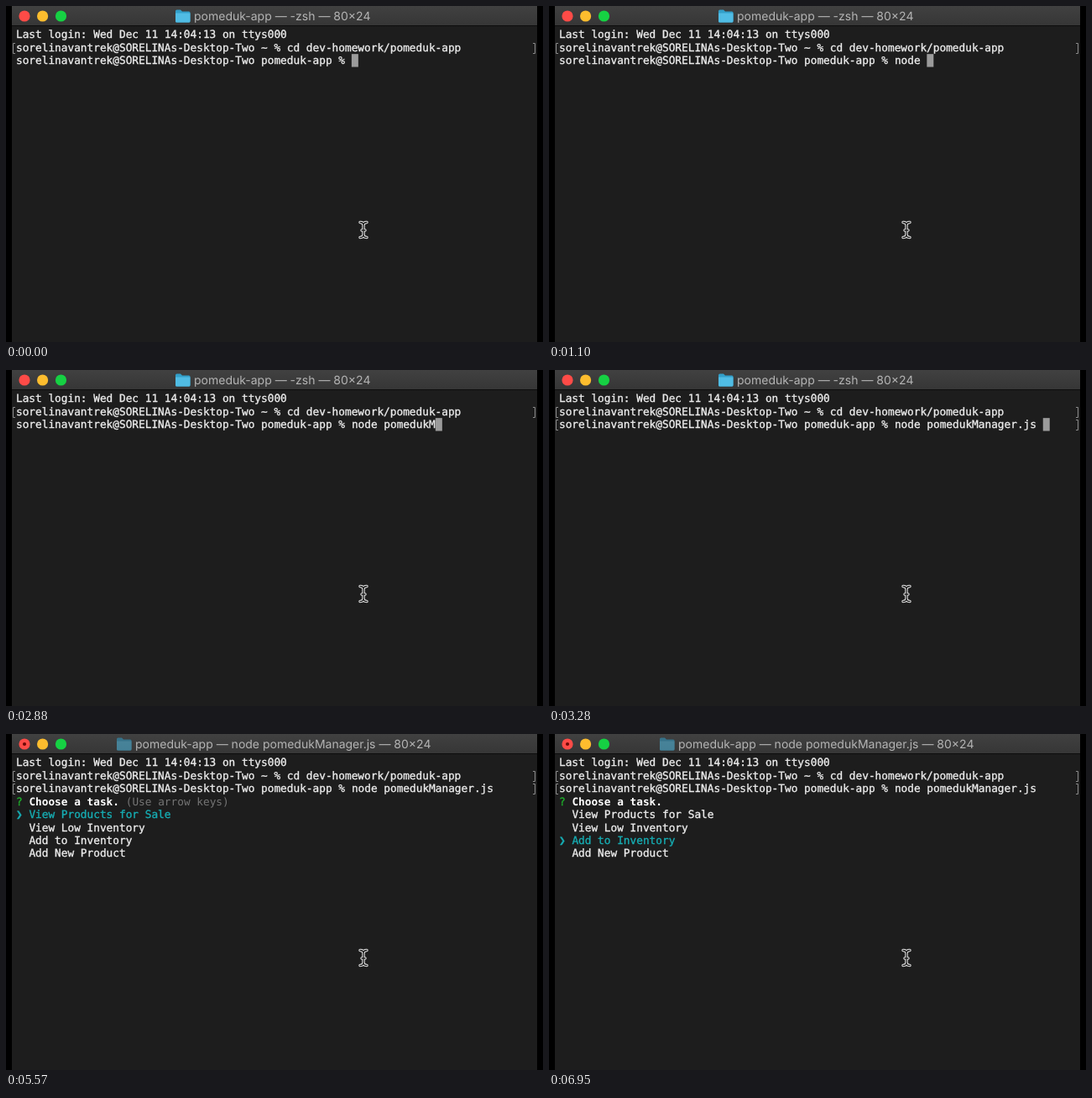
These frames come from a looping animation (640x400 px, 8 s). An HTML page:

```html
<!DOCTYPE html>
<html lang="en">
<head>
<meta charset="utf-8">
<title>Terminal</title>
<style>
  html, body { margin: 0; width: 100%; height: 100%; overflow: hidden; background: #000; }
  svg { display: block; width: 640px; height: 400px; }
  text { white-space: pre; text-rendering: geometricPrecision; }
  .term text {
    font: 12.773px "DejaVu Sans Mono", monospace;
    fill: #ececec; stroke: #ececec; stroke-width: .35px;
  }
  .term .bold { font-weight: bold; fill: #fff; stroke: none; }
  .term .ask { fill: #1fae2b; stroke: #1fae2b; }
  .term .hint { fill: #757575; stroke: none; }
  .term .on { fill: #16adb3; stroke: #16adb3; }
  .title { font: 14px Inter, sans-serif; fill: #b4b4b4; }
  .marks { fill: none; stroke: #8c8c8c; stroke-width: 1; }
</style>
</head>
<body>
<svg viewBox="0 0 640 400">
  <defs>
    <linearGradient id="barFill" x2="0" y2="1">
      <stop offset="0" stop-color="#414141"/>
      <stop offset="1" stop-color="#363636"/>
    </linearGradient>
    <path id="marks" d="M11 -9.5H8.5V2.5H11M628 -9.5H630.5V2.5H628"/>
    <path id="beam" d="M422 257.5Q426 257.5 426 261Q426 257.5 430 257.5M426 260V273M422 275.5Q426 275.5 426 272Q426 275.5 430 275.5M424 267H428"/>
  </defs>

  <rect x="7" width="626" height="400" fill="#1d1d1d"/>
  <rect x="7" width="626" height="23" fill="url(#barFill)"/>
  <rect x="7" y="23" width="626" height="1" fill="#0c0c0c"/>
  <circle cx="22" cy="12" r="6.6" fill="#fe4b47"/>
  <circle id="dot" cx="22" cy="12" r="2.1" fill="#6d0906"/>
  <circle cx="43.6" cy="12" r="6.6" fill="#fdbd2e"/>
  <circle cx="65.5" cy="12" r="6.6" fill="#16d143"/>

  <g id="heading">
    <g id="folder">
      <path d="M0 6Q0 4.5 1.5 4.5H6L8 6.5H16Q17.5 6.5 17.5 8V18Q17.5 19.5 16 19.5H1.5Q0 19.5 0 18Z" fill="#329fc9"/>
      <path d="M0 8.5H17.5V18Q17.5 19.5 16 19.5H1.5Q0 19.5 0 18Z" fill="#50bce4"/>
    </g>
    <text id="title" class="title" x="22" y="17.2"></text>
  </g>

  <g id="term" class="term"></g>
  <rect id="cursor" width="8" height="15.4" fill="#9b9b9b"/>

  <g fill="none" stroke-linecap="round">
    <use href="#beam" stroke="#e4e4e4" stroke-width="3.4"/>
    <use href="#beam" stroke="#1d1d1d" stroke-width="1.3"/>
  </g>
</svg>

<script>
  const LOOP = 8000, LEFT = 12, CELL = 7.69, ROW = 15.43, BASE = 38.4;
  const NS = "http://www.w3.org/2000/svg";
  const $ = id => document.getElementById(id);
  const term = $("term");
  const baseline = row => BASE + row * ROW;

  function write(row, col, string, cls = "") {
    const el = document.createElementNS(NS, "text");
    el.setAttribute("x", LEFT + col * CELL);
    el.setAttribute("y", baseline(row));
    el.setAttribute("class", cls);
    el.textContent = string;
    term.append(el);
    return el;
  }

  function bracket(row) {
    const el = document.createElementNS(NS, "use");
    el.setAttribute("href", "#marks");
    el.setAttribute("y", Math.round(baseline(row)));
    el.setAttribute("class", "marks");
    term.append(el);
    return el;
  }

  const show = (el, on) => el.setAttribute("visibility", on ? "visible" : "hidden");

  const host = "sorelinavantrek@SORELINAs-Desktop-Two";
  const app = "pomeduk-app";
  const command = "node pomedukManager.js ";
  const prompt = `${host} ${app} % `;

  write(0, 0, "Last login: Wed Dec 11 14:04:13 on ttys000");
  write(1, 0, `${host} ~ % cd dev-homework/${app}`);
  write(2, 0, prompt);
  bracket(1);
  const entered = bracket(2);
  const typed = write(2, prompt.length, "");

  const hint = write(3, 17, "(Use arrow keys)", "hint");
  const pointer = write(4, 0, "❯", "on");
  const items = ["View Products for Sale", "View Low Inventory", "Add to Inventory", "Add New Product"]
    .map((label, i) => write(4 + i, 2, label));
  const menu = [write(3, 0, "?", "ask"), write(3, 2, "Choose a task.", "bold"), pointer, ...items];

  // [time, characters typed]
  const keys = [[0, 0], [410, 1], [550, 2], [690, 3], [830, 4], [1100, 5], [1640, 6], [1780, 7],
    [1920, 9], [2200, 11], [2340, 12], [2880, 13], [3010, 14], [3140, 15], [3280, 23]];
  const ENTER = 3820, RUN = 3960, MENU = 5570, MOVES = [6550, 6820];

  function draw(t) {
    const count = keys.filter(([at]) => at <= t).pop()[1];
    const sent = t >= ENTER, running = t >= RUN, choosing = t >= MENU;
    const picked = MOVES.filter(at => at <= t).length;

    typed.textContent = command.slice(0, count);
    show(entered, t >= 3280);
    $("cursor").setAttribute("x", LEFT + (sent ? 0 : prompt.length + count) * CELL);
    $("cursor").setAttribute("y", baseline(sent ? 3 : 2) - 12.1);
    show($("cursor"), !choosing);

    show($("dot"), running);
    $("heading").setAttribute("transform", `translate(${running ? 132 : 202} 0)`);
    $("folder").setAttribute("opacity", running ? .55 : 1);
    $("title").textContent = `${app} — ${running ? command.trim() : "-zsh"} — 80×24`;

    menu.forEach(el => show(el, choosing));
    show(hint, choosing && !picked);
    pointer.setAttribute("y", baseline(4 + picked));
    items.forEach((el, i) => el.setAttribute("class", i === picked ? "on" : ""));
  }

  const start = performance.now();
  function tick() {
    draw((performance.now() - start) % LOOP);
    requestAnimationFrame(tick);
  }
  tick();
</script>
</body>
</html>
```
